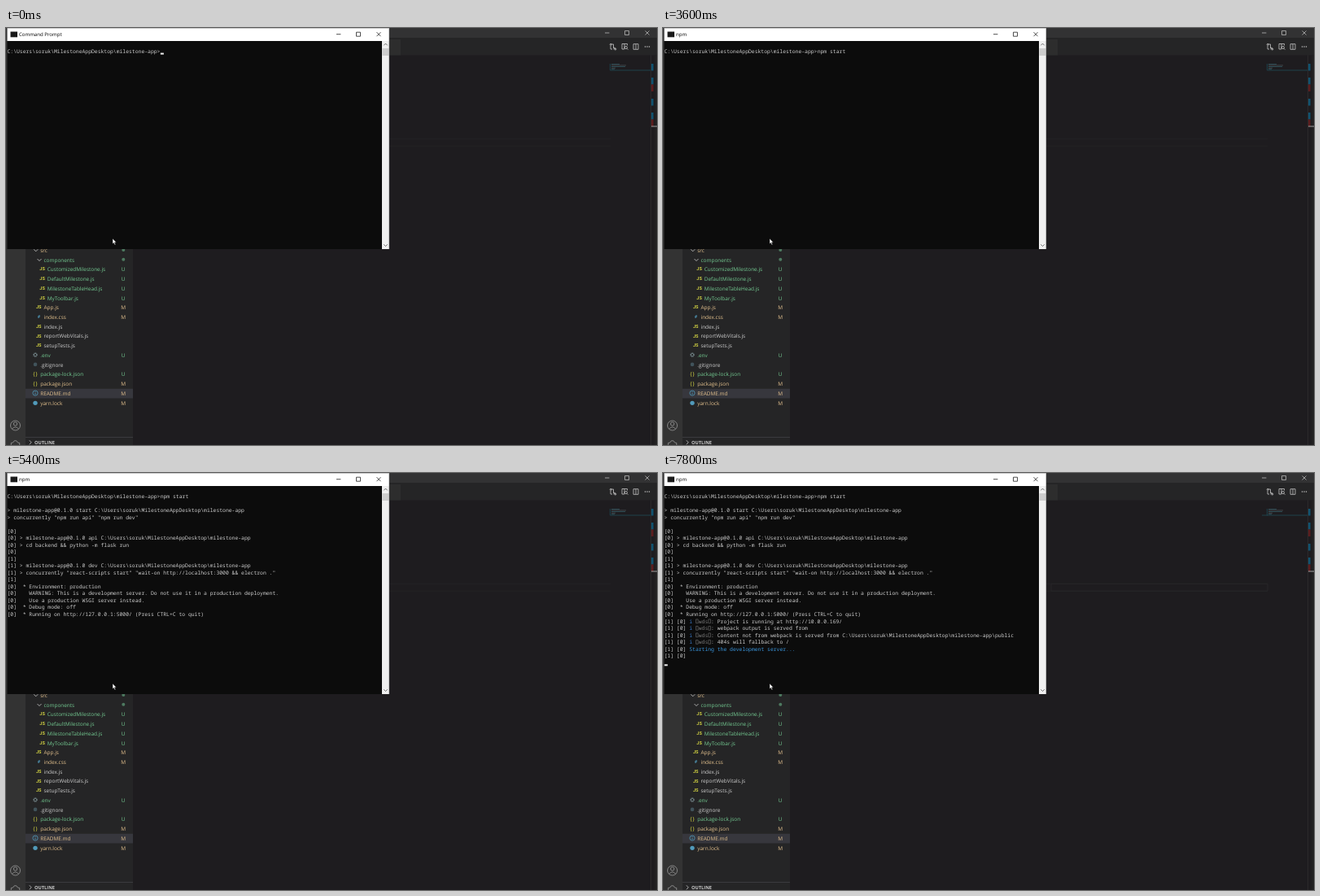
Recreate the animation shown at these times as an HTML page. Size 800x513 px, loop 8 s.

```html
<!DOCTYPE html>
<html lang="en">
<head>
<meta charset="utf-8">
<title>Starting a development server</title>
<style>
  html, body { margin: 0; width: 100%; height: 100%; overflow: hidden; background: #1e1c1f; }
  svg { display: block; width: 800px; height: 513px; }
  text { white-space: pre; text-rendering: geometricPrecision; font: 6.45px "Open Sans", sans-serif; }
  .mono { font: 6.4px "Noto Sans Mono", monospace; }
  .title { font-size: 6.1px; }
  .icon { font: 700 5.6px Roboto, sans-serif; }
  .braces { font: 6.6px Roboto, sans-serif; letter-spacing: .9px; }
  .line { fill: none; stroke-width: .8; }
</style>
</head>
<body>
<svg id="stage" viewBox="0 0 800 513"></svg>
<script>
const LOOP = 8000;
const GREEN = '#73c991', SAND = '#e2c08d', GREY = '#cccccc', YELLOW = '#cbcb41', BLUE = '#519aba';
const stage = document.getElementById('stage');

function add(tag, attrs, content = '') {
  const node = document.createElementNS('http://www.w3.org/2000/svg', tag);
  for (const key in attrs) node.setAttribute(key, attrs[key]);
  node.textContent = content;
  return stage.appendChild(node);
}
const box = (x, y, width, height, fill) => add('rect', { x, y, width, height, fill });
const dot = (cx, cy, r, fill) => add('circle', { cx, cy, r, fill });
const ring = (cx, cy, r, stroke) => add('circle', { cx, cy, r, stroke, class: 'line' });
const line = (d, stroke) => add('path', { d, stroke, class: 'line' });
const label = (x, y, content, fill, cls = '') => add('text', { x, y, fill, class: cls }, content);
function centered(...args) {
  const node = label(...args);
  node.setAttribute('text-anchor', 'middle');
}

// Visible only between two times of the loop, with hard cuts.
function show(node, from, to = LOOP) {
  const key = (time, opacity) => ({ offset: time / LOOP, opacity, easing: 'step-end' });
  const keys = [key(from, 1), key(to, to < LOOP ? 0 : 1)];
  if (from > 0) keys.unshift(key(0, 0));
  if (to < LOOP) keys.push(key(LOOP, 0));
  node.animate(keys, { duration: LOOP, iterations: Infinity });
}

function windowButtons(x, y, color) {
  line(`M${x} ${y}h5.4`, color);
  line(`M${x + 24.5} ${y - 2.5}h5v5h-5z`, color);
  line(`M${x + 49.5} ${y - 2.5}l5 5m0-5l-5 5`, color);
}

function drawEditor() {
  box(0, 0, 800, 513, '#1e1c1f');
  box(0, 0, 800, 12, '#323233');
  box(156, 12, 644, 21.5, '#252526');
  box(156, 14, 329, 19.5, '#2d2d2d');
  windowButtons(736, 6, '#b8b8b8');

  line('M743 20h3.5v5h2m-1.5-1.5l1.5 1.5-1.5 1.5M745 26h-2v-4', '#c5c5c5');
  ring(743.2, 20.4, 1, '#c5c5c5');
  ring(748.8, 26, 1, '#c5c5c5');
  line('M760 26h-3v-6.5h6.5v2M760 19.5v6.5', '#c5c5c5');
  ring(761.8, 24, 1.6, '#c5c5c5');
  line('M763 25.2l1.4 1.5', '#c5c5c5');
  line('M771 19.7h6v6.6h-6zM774 19.7v6.6', '#c5c5c5');
  for (const x of [785.5, 788, 790.5]) dot(x, 23, .75, '#c5c5c5');

  line('M471 136.3H743M471 145.2H743', '#252426');
  show(line('M477 136.3H743V145.2H477z', '#2a292b'), 6800);

  line('M742.4 44V52H792', '#1f4c57');
  show(line('M736 52H743', '#1f4c57'), 6800);
  [10, 18, 17, 5, 4].forEach((w, i) => box(744, 44 + i * 1.6, w, .7, i % 2 ? '#50595e' : '#35616a'));
  box(792.4, 33.5, .6, 480, '#343434');
  box(797, 33.5, 3, 480, '#222122');
  for (const y of [44, 61, 87, 104]) box(793, y, 2.6, 8.5, '#125370');
  for (const y of [69.5, 112.5]) box(793, y, 2.6, 8.5, '#5c1d1e');
  box(793, 120.5, 7, 1, '#a0a0a0');
}

function drawSidebar() {
  box(0, 12, 24, 501, '#333333');
  box(24, 12, 132, 501, '#252526');
  box(24, 443.8, 132, 11.7, '#37373d');

  ring(11.5, 489, 6, '#9a9a9a');
  ring(11.5, 487, 2.2, '#9a9a9a');
  line('M7.5 493.2q4-4.6 8 0', '#9a9a9a');
  line('M6.3 513v-2.5l2.2-.4 1.7-2.3h2.6l1.7 2.3 2.2.4V513', '#9a9a9a');

  // depth, icon, name, color, status
  const files = [
    [0, 'v', 'src', SAND, '•'], [1, 'v', 'components', GREEN, '•'],
    [2, 'JS', 'CustomizedMilestone.js', GREEN, 'U'], [2, 'JS', 'DefaultMilestone.js', GREEN, 'U'],
    [2, 'JS', 'MilestoneTableHead.js', GREEN, 'U'], [2, 'JS', 'MyToolbar.js', GREEN, 'U'],
    [1, 'JS', 'App.js', SAND, 'M'], [1, '#', 'index.css', SAND, 'M'],
    [1, 'JS', 'index.js', GREY], [1, 'JS', 'reportWebVitals.js', GREY], [1, 'JS', 'setupTests.js', GREY],
    [0, 'gear', '.env', GREEN, 'U'], [0, 'mark', '.gitignore', GREY],
    [0, '{}', 'package-lock.json', GREEN, 'U'], [0, '{}', 'package.json', SAND, 'M'],
    [0, 'info', 'README.md', SAND, 'M'], [0, 'disc', 'yarn.lock', SAND, 'M'],
  ];
  const icons = {
    v: (x, y) => line(`M${x - 1.8} ${y - 1.2}l2.5 2.5 2.5-2.5`, GREY),
    gear(x, y) {
      ring(x, y - .5, 1.7, '#7f9499');
      ring(x, y - .5, 2.5, '#7f9499').setAttribute('stroke-dasharray', '1 .96');
    },
    mark: (x, y) => dot(x, y - .5, 2.3, '#41535b'),
    disc: (x, y) => dot(x, y, 2.7, BLUE),
    info(x, y) {
      ring(x, y - .5, 3.1, BLUE);
      line(`M${x} ${y - 1}v2.4M${x} ${y - 2.5}v.8`, BLUE);
    },
    JS: (x, y) => centered(x, y + 1.5, 'JS', YELLOW, 'icon'),
    '#': (x, y) => centered(x, y + 1.8, '#', BLUE, 'icon'),
    '{}': (x, y) => centered(x + .4, y + 1.8, '{}', YELLOW, 'braces'),
  };
  files.forEach(([depth, icon, name, color, status], i) => {
    const y = 273.5 + i * 11.74, x = 36 + depth * 4.3;
    icons[icon](x, y);
    label(x + 6.2, y + 2.3, name, color);
    if (status === '•') dot(144.3, y - .5, 2, '#4d7a60');
    else if (status) centered(144.2, y + 2.3, status, color);
  });

  box(24, 503.3, 132, .7, '#45454a');
  line('M28.8 507.3l2.4 2.5-2.4 2.5', GREY);
  label(35, 512.2, 'OUTLINE', GREY).setAttribute('style', 'font-weight:700;font-size:5.7px');
}

function drawConsole() {
  box(1.5, 0, 469.5, 272, '#0c0c0c');
  box(1.5, 0, 469.5, 16, '#ffffff');
  box(5.5, 4.5, 8.5, 6.8, '#1a1a1a');
  show(label(16, 10.2, 'Command Prompt', '#000', 'title'), 0, 3400);
  show(label(16, 10.2, 'npm', '#000', 'title'), 3400);
  windowButtons(406, 7.7, '#222');

  box(462, 16, 9, 256, '#f0f0f0');
  box(462.5, 25, 8, 9, '#cdcdcd');
  line('M464.3 21.3l2.2-2.2 2.2 2.2M464.3 266.3l2.2 2.2 2.2-2.2', '#505050');
  line('M1.5 .2H470.8V272', '#6a6a6a').setAttribute('style', 'stroke-width:.5');
}

const CELL = 3.84, ROW = 8.53;
const colX = col => 1.5 + col * CELL;
const print = (row, col, content, color = GREY) =>
  label(colX(col), 31 + row * ROW, content, color, 'mono');

function playConsole() {
  const home = 'C:\\Users\\soruk\\MilestoneAppDesktop\\milestone-app';
  const prompt = home + '>', start = prompt.length;
  print(0, 0, prompt);

  const typing = [[1000, 0, 'n'], [1200, 1, 'pm'], [2000, 4, 's'], [2400, 5, 'tar'], [3000, 8, 't']];
  for (const [time, col, keys] of typing) show(print(0, start + col, keys), time);

  const output = [
    [4000, 2, `> milestone-app@0.1.0 start ${home}`],
    [4000, 3, '> concurrently "npm run api" "npm run dev"'],
    [4400, 5, '[0]'],
    [4400, 6, `[0] > milestone-app@0.1.0 api ${home}`],
    [4400, 7, '[0] > cd backend && python -m flask run'],
    [4400, 8, '[0]'],
    [4600, 9, '[1]'],
    [4600, 10, `[1] > milestone-app@0.1.0 dev ${home}`],
    [4600, 11, '[1] > concurrently "react-scripts start" "wait-on http://localhost:3000 && electron ."'],
    [4600, 12, '[1]'],
    [5200, 13, '[0]  * Environment: production'],
    [5200, 14, '[0]    WARNING: This is a development server. Do not use it in a production deployment.'],
    [5200, 15, '[0]    Use a production WSGI server instead.'],
    [5400, 16, '[0]  * Debug mode: off'],
    [5400, 17, '[0]  * Running on http://127.0.0.1:5000/ (Press CTRL+C to quit)'],
  ];
  for (const [time, row, content] of output) show(print(row, 0, content), time);

  const served = 7800;
  const notes = ['Project is running at http://10.0.0.169/', 'webpack output is served from',
    `Content not from webpack is served from ${home}\\public`, '404s will fallback to /'];
  notes.forEach((note, i) => {
    const row = 18 + i;
    const parts = [print(row, 0, '[1] [0]'), print(row, 8, 'i', '#3a78c8'),
      print(row, 11, 'wds', '#767676'), print(row, 15, ': ' + note)];
    for (const col of [10, 14])
      parts.push(line(`M${colX(col) + .6} ${26.4 + row * ROW}h2.6v4.8h-2.6z`, '#5a5a5a'));
    for (const part of parts) show(part, served);
  });
  show(print(22, 0, '[1] [0]'), served);
  show(print(22, 8, 'Starting the development server...', '#3a96dd'), served);
  show(print(23, 0, '[1] [0]'), served);

  // from, to, row, column of the blinking caret
  const carets = [
    [0, 400, 0, start], [800, 1000, 0, start], [1000, 1200, 0, start + 1], [1200, 1400, 0, start + 3],
    [1800, 2000, 0, start + 4], [2800, 3000, 0, start + 8], [3400, 3600, 1, 0],
    [4800, 5000, 13, 0], [5800, 6800, 18, 0], [7200, 7800, 18, 0], [7800, LOOP, 24, 0],
  ];
  for (const [from, to, row, col] of carets)
    show(box(colX(col) + .2, 30.6 + row * ROW, 4, 2, '#f2f2f2'), from, to);
}

drawEditor();
drawSidebar();
drawConsole();
playConsole();
add('path', { d: 'M131 259v6.6l1.5-1.4 1.1 2.5 1.1-.5-1.1-2.4h2z', fill: '#fff', stroke: '#000', 'stroke-width': .4 });
</script>
</body>
</html>
```
